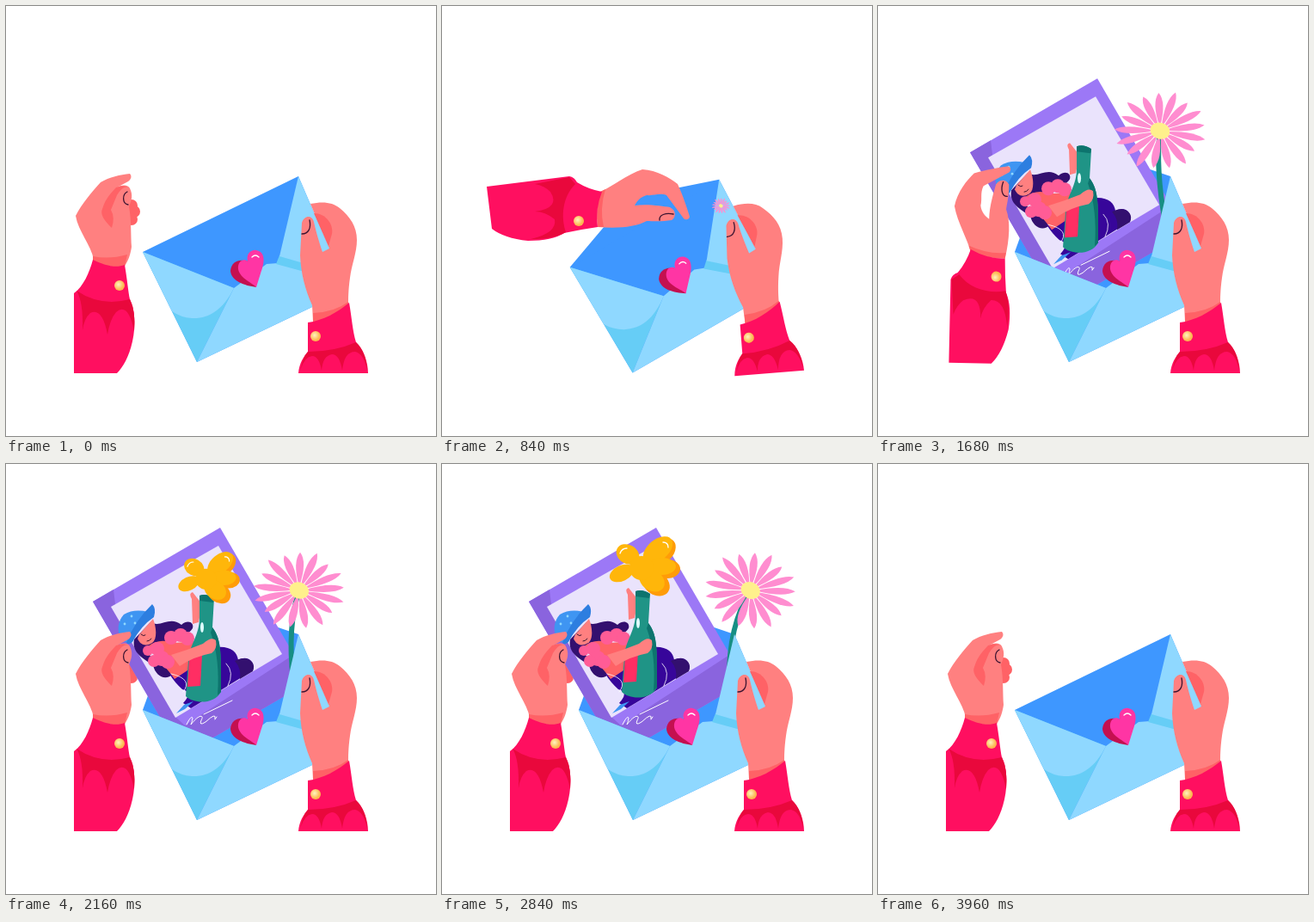
These frames come from a looping animation (500x500 px, 4000 ms). An HTML page:

```html
<!DOCTYPE html>
<html lang="en">
<head>
<meta charset="utf-8">
<title>Love letter</title>
<style>
  html, body { margin: 0; width: 100%; height: 100%; overflow: hidden; background: #fff; }
  svg { display: block; width: 100vw; height: 100vh; }
  .skin { fill: #ff8080; } .blush { fill: #ff6266; }
  .sleeve { fill: #ff0f60; } .frill { fill: #e9083c; }
  .light { fill: #8fd8ff; } .mid { fill: #66cdf6; } .blue { fill: #3e97ff; }
  .card { fill: #9c78f6; } .shade { fill: #8a64de; } .hair { fill: #33106f; } .skirt { fill: #37069a; }
  .blouse { fill: #ff5c96; } .bottle { fill: #1f9486; } .hat { fill: #3f95f2; }
  .amber { fill: #ff9c08; }
  .line { fill: none; stroke: #3a1330; stroke-width: 1.3; stroke-linecap: round; }
  .white { fill: none; stroke: #fff; stroke-width: 1.3; stroke-linecap: round; }
</style>
</head>
<body>
<svg viewBox="0 0 500 500">
  <defs>
    <radialGradient id="gold" cx=".4" cy=".4"><stop offset="0" stop-color="#fff3c0"/><stop offset="1" stop-color="#fdb750"/></radialGradient>
    <clipPath id="pocket"><path d="M0 0H500L340 198L376 282L356 350L222 414L159 286H0Z"/></clipPath>
  </defs>

  <!-- fingers that stay behind the card -->
  <g id="restFingers" class="blush">
    <circle cx="146" cy="232" r="7"/><circle cx="149" cy="239" r="7"/><circle cx="146" cy="248" r="7"/>
  </g>

  <g id="letter">
    <path id="flap" class="blue"/>
    <path class="blue" d="M159 286L340 198L376 282L356 350L222 414Z"/>
    <g clip-path="url(#pocket)"><g id="card">
      <path class="card" d="M249 74L101 160L205 339L353 253Z"/>
      <path class="shade" d="M101 160L125 146L127 163L197 294L208 304L334 222L353 253L205 339Z"/>
      <path fill="#eae3fc" d="M247 95L122 166L197 295L321 221Z"/>
      <path class="hair" d="M168 184C180 191 190 176 204 187C212 180 219 185 217 191C210 202 192 202 182 208L164 212C166 230 178 228 194 244C186 253 174 247 171 234C160 226 146 220 149 204Z"/>
      <path class="skirt" d="M190 244C212 240 222 218 244 213C260 211 269 218 270 228C280 222 290 229 287 240L245 266L215 284L206 278Q218 265 205 262Q196 254 190 244Z"/>
      <path class="hair" d="M266 229C280 221 292 230 287 241L272 250Q274 238 266 229Z"/>
      <path class="hat" d="M198 290L207 280L218 276L208 285Z"/>
      <path class="skin" d="M155 198L171 180C175 190 176 204 170 208C162 213 156 210 153 203Z"/>
      <path class="line" d="M157 198q3 3 5 1M164 206q3 0 5-3" style="stroke-width:1"/>
      <path class="hat" d="M134 206Q126 187 137 175Q149 168 165 172L143 208Z"/>
      <path fill="#2d7ee0" d="M170 163Q175 168 172 178Q157 188 147 207Q143 211 140 208Q149 183 170 163Z"/>
      <g fill="#8fd8ff"><circle cx="138" cy="186" r="1.4"/><circle cx="146" cy="177" r="1.4"/><circle cx="150" cy="185" r="1.4"/></g>
      <path class="blush" d="M165 212Q178 202 194 208L224 206L214 238L196 250L190 242Z"/>
      <g class="blouse">
        <circle cx="192" cy="202" r="8"/><circle cx="203" cy="199" r="8"/><circle cx="211" cy="203" r="8"/>
        <circle cx="165" cy="217" r="6"/><circle cx="176" cy="215" r="8"/><circle cx="181" cy="226" r="9"/><circle cx="172" cy="229" r="7"/><circle cx="188" cy="230" r="8"/>
      </g>
      <g id="bottle">
        <path class="skin" d="M216 157Q212 150 217 149L228 163L224 184L217 186Z"/>
        <path class="bottle" d="M225 153Q233 150 242 156L240 190C251 204 250 222 250 265C242 280 218 279 209 270L212 228C214 208 225 200 225 178Z"/>
        <path fill="#0d746e" d="M225 153Q233 150 242 156L241 161L225 159ZM240 190C251 204 250 222 250 265L246 269Q249 226 238 196Z"/>
        <path fill="#ff2e63" d="M213 226L228 222L226 258L211 259Z"/>
        <ellipse cx="228" cy="190" rx="2" ry="6" fill="#dffcff"/>
      </g>
      <path class="skin" d="M192 222Q212 216 229 209Q239 200 244 205Q246 215 239 220Q218 224 202 235Z"/>
      <path class="white" d="M192 244Q218 250 206 265M256 232Q266 242 258 258" style="stroke-width:.8"/>
      <path class="white" d="M210 303C216 290 219 293 215 303C224 291 231 291 227 298Q224 305 232 300Q245 288 243 296M230 291L263 275M243 297l2-3" style="stroke-width:1"/>
    </g></g>
    <g id="blossom" fill="#ffb60a">
      <ellipse class="amber" cx="262" cy="122" rx="15" ry="11"/>
      <ellipse class="amber" cx="249" cy="139" rx="17" ry="13" transform="rotate(35 249 139)"/>
      <ellipse class="amber" cx="255" cy="102" rx="19" ry="13" transform="rotate(-40 255 102)"/>
      <ellipse cx="209" cy="127" rx="15" ry="9" transform="rotate(-25 209 127)"/>
      <ellipse cx="216" cy="105" rx="14" ry="11" transform="rotate(30 216 105)"/>
      <ellipse cx="251" cy="100" rx="20" ry="12" transform="rotate(-40 251 100)"/>
      <ellipse cx="256" cy="119" rx="16" ry="10"/>
      <ellipse cx="244" cy="135" rx="16" ry="12" transform="rotate(35 244 135)"/>
      <circle cx="232" cy="121" r="14"/>
      <path class="white" d="M207 104q2-6 8-6M257 91q6 0 6 6"/>
    </g>
    <path id="stem" fill="none" stroke="#178f84"/>

    <path class="mid" d="M159 286L265 328L222 414Z"/>
    <path class="light" d="M159 286L265 328C252 354 235 364 216 363Q203 362 193 355Z"/>
    <path class="light" d="M222 414L265 328L303 300L316 299L376 315L356 350Z"/>
    <path class="mid" d="M314 300L318 290L380 308V318Z"/>
    <path class="light" d="M340 198L318 291L370 306L376 282Z"/>
    <g id="flower"></g>

    <path fill="#c41050" d="M291 327C277 325 262 320 261 308C262 297 272 293 284 298Z"/>
    <path fill="#ff35a4" d="M291 327C287 322 272 317 270 306C269 296 277 293 281 297C279 288 285 283 291 284C302 286 301 298 296 311Z"/>
    <path class="white" d="M286 292Q290 288 294 292"/>

    <path class="skin" d="M354 230C368 227 380 228 388 235C400 245 408 256 408 272C408 287 402 300 400 316C398 330 398 340 398 347C390 358 372 366 357 367L356 348C348 330 343 312 342 290L344 252C347 243 356 243 358 251C361 265 366 280 368 286L376 282Z"/>
    <path class="blush" d="M358 241C372 241 381 254 379 265L375 279Z"/>
    <path class="line" d="M353 249C355 258 352 265 344 265"/>
    <path class="blush" d="M357 357Q382 356 398 344L399 350L357 369Z"/>
    <path class="sleeve" d="M351 368C368 366 386 356 399 345C402 362 403 378 407 391C416 400 421 414 421 427H340C341 415 346 408 351 402Z"/>
    <path class="frill" d="M351 402Q382 402 407 391Q419 402 420 424Q416 404 406 402Q393 402 391 424Q388 405 379 405Q368 407 367 424Q364 407 356 407Q347 408 343 422Q345 408 351 402Z"/>
    <circle cx="360" cy="384" r="6" fill="url(#gold)"/>
  </g>

  <g id="restArm">
    <path class="skin" d="M102 295C99 278 84 262 81 244C88 230 100 216 110 205C120 199 133 196 144 195C147 198 145 202 142 204L129 211C136 207 142 208 144 212C148 220 146 226 143 233C146 250 145 268 146 280C145 288 142 297 138 302Q118 302 102 295Z"/>
    <path class="blush" d="M128 211C122 218 116 223 112 236Q108 244 123 258Q127 246 122 237L129 220Q137 207 144 212Q138 207 128 211ZM101 291Q120 295 141 289L138 303Q118 305 101 296Z"/>
    <path class="line" d="M141 216C135 219 135 230 142 231"/>
    <path class="sleeve" d="M101 295C115 302 128 305 138 301C141 318 142 332 144 341C150 352 151 372 147 390C143 408 136 420 129 427H79V334C90 326 97 310 101 295Z"/>
    <path class="frill" d="M82 331Q110 350 144 341Q151 355 149 378Q142 344 128 356Q121 364 118 382Q112 350 98 357Q91 363 89 377Q90 344 82 331Z"/>
    <circle cx="132" cy="325" r="6" fill="url(#gold)"/>
  </g>

  <g id="reachArm">
    <path class="skin" d="M184 216C198 210 215 196 233 190C250 191 265 200 274 207C280 220 285 235 288 245C287 249 283 249 281 247L261 220C252 217 246 221 238 220C230 222 226 228 224 232C240 230 256 233 265 234C273 238 272 246 267 249C255 251 245 250 238 250C225 257 205 259 181 257Z"/>
    <path class="blush" d="M184 216Q178 236 181 257L188 257Q183 236 190 213Z"/>
    <path class="line" d="M269 242C260 240 252 243 253 249"/>
    <path class="sleeve" d="M52 210L148 198Q154 199 157 205Q170 213 186 216Q178 236 181 257Q160 260 142 264Q128 273 100 273Q72 270 58 259Z"/>
    <path class="frill" d="M108 207L148 199L155 207C140 222 138 245 144 263Q130 271 103 271Q134 264 131 248Q120 239 108 239Q138 235 126 216Q119 209 108 207Z"/>
    <circle cx="159" cy="250" r="6" fill="url(#gold)"/>
  </g>
</svg>
<script>
const LOOP = 4000, STEP = 40;
const el = id => document.getElementById(id);
const place = (id, transform) => el(id).setAttribute('transform', transform);
const show = (id, visible) => el(id).style.display = visible ? '' : 'none';

// Eased value at time t for a list of [time, value] keys.
function track(t, ...keys) {
  if (t <= keys[0][0]) return keys[0][1];
  for (let i = 1; i < keys.length; i++) {
    const [t0, a] = keys[i - 1], [t1, b] = keys[i];
    if (t < t1) return a + (b - a) * (1 - Math.cos(Math.PI * (t - t0) / (t1 - t0))) / 2;
  }
  return keys[keys.length - 1][1];
}

const PETALS = 17;
let petals = '';
for (let i = 0; i < PETALS; i++) {
  const length = 52 + 3 * Math.sin(i * 2.4);
  petals += `<path fill="#ff8dd0" transform="scale(1 .86) rotate(${i * 360 / PETALS - 3})" d="M5 0Q${length * .75} -9 ${length} 0Q${length * .75} 9 5 0"/>`;
}
el('flower').innerHTML = petals + '<ellipse rx="11.5" ry="9.5" fill="#fff08c" transform="rotate(20)"/>';

function drawFlower(t) {
  const grow = track(t, [720, 0], [1120, 1], [3480, 1], [3840, 0]);
  const sway = Math.sin(2 * Math.PI * (t - 2220) / 1780);
  const lift = track(t, [1400, -9], [1800, 0]);
  const baseX = 334, baseY = 252;
  const x = baseX + grow * (10.5 + 17.5 * sway);
  const y = baseY + grow * (-105 + lift);
  const bendX = baseX + grow * (-6 + 6 * sway);
  el('stem').setAttribute('d', `M${baseX} ${baseY}Q${bendX} ${baseY - 64 * grow} ${x} ${y}`);
  el('stem').setAttribute('stroke-width', 6 * grow);
  place('flower', `translate(${x} ${y}) rotate(${5 * sway}) scale(${grow})`);
  show('flower', grow > 0);
  show('stem', grow > 0);
}

function drawLetter(t) {
  const tilt = track(t, [0, 0], [460, 24], [860, -4.7], [1120, 0]);
  place('letter', `rotate(${tilt} 380 425)`);

  const open = track(t, [690, 0], [940, 1], [3740, 1], [3940, 0]);
  el('flap').setAttribute('d', `M159 286L${283 - 76 * open} ${320 - 167 * open}L340 198L280 300Z`);

  const hidden = track(t, [1200, 240], [1760, 0], [3440, 0], [3840, 240]);
  const cardX = hidden * .51, cardY = hidden * .86;
  place('card', `translate(${cardX} ${cardY})`);
  show('card', hidden < 240);

  const hop = track(t, [2160, 0], [2500, -8], [2840, -5], [3400, 0]);
  place('bottle', `translate(0 ${hop})`);

  const bloom = track(t, [1720, 0], [2160, .87], [2480, 1], [3420, 1], [3620, 0]);
  const rise = track(t, [2160, 13], [2480, -20], [2840, 0], [3400, 8]);
  place('blossom', `translate(${cardX} ${cardY + rise}) translate(237 121) scale(${bloom}) translate(-237 -121)`);
  show('blossom', bloom > 0);
}

function drawLeftArm(t) {
  const reaching = t > 560 && t < 1760;
  show('restArm', !reaching);
  show('restFingers', !reaching);
  show('reachArm', reaching);
  const x = track(t, [560, 132], [840, 159], [1200, 190], [1360, 190], [1760, 132]);
  const y = track(t, [560, 325], [840, 250], [1200, 216], [1360, 216], [1760, 325]);
  const angle = track(t, [560, -95], [840, 0], [1200, 45], [1360, 45], [1760, -95]);
  place('reachArm', `translate(${x} ${y}) rotate(${angle}) translate(-159 -250)`);
}

function frame(now) {
  const t = Math.floor(now % LOOP / STEP) * STEP;
  drawLetter(t);
  drawFlower(t);
  drawLeftArm(t);
  requestAnimationFrame(frame);
}
frame(performance.now());
</script>
</body>
</html>
```
